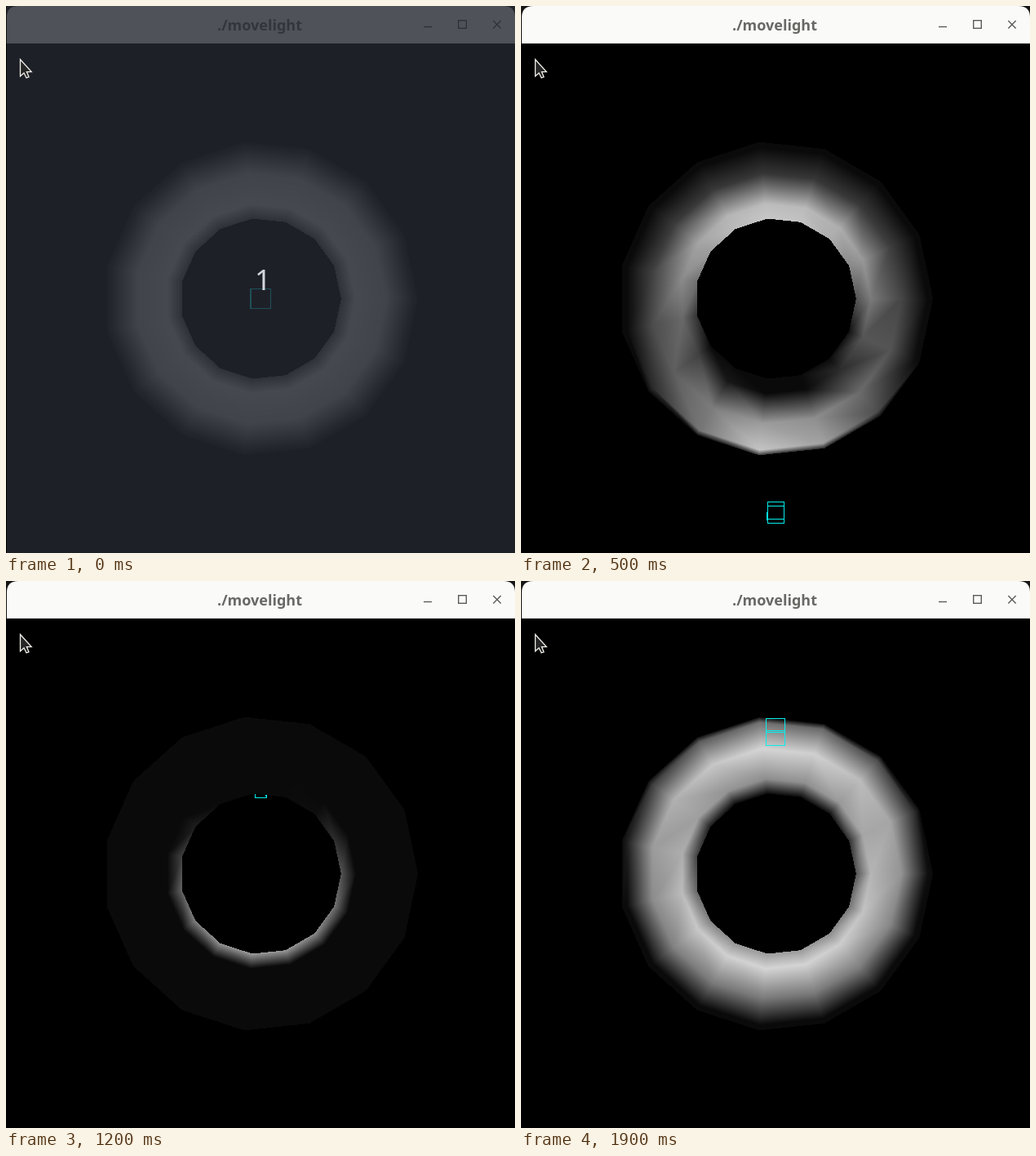
These frames come from a looping animation (624 px wide and 670 px high, 3.1 s). An HTML page with a canvas:

```html
<!DOCTYPE html>
<html lang="en">
<head>
<meta charset="utf-8">
<title>./movelight</title>
<style>
html, body { margin: 0; width: 100%; height: 100%; overflow: hidden; background: #000; }
canvas, svg { position: absolute; left: 0; top: 0; width: 624px; height: 670px; display: block; }
text { font-family: "Noto Sans", "Open Sans", sans-serif; text-anchor: middle; }
</style>
</head>
<body>
<canvas id="view" width="624" height="670"></canvas>
<svg viewBox="0 0 624 670">
  <rect width="624" height="46" fill="#151515"/>
  <path d="M1 46V14Q1 0 15 0H610Q624 0 624 14V46Z" fill="#fafaf8"/>
  <rect x="1" y="45" width="623" height="1" fill="#dededb"/>
  <text x="311" y="30" font-size="18" font-weight="700" fill="#686865">./movelight</text>
  <g fill="none" stroke="#5c5c5a" stroke-width="1.4">
    <path d="M512 25.5H522"/>
    <rect x="554.7" y="17.7" width="9.6" height="9.6"/>
    <path d="M597.3 18L606.7 27.4M606.7 18L597.3 27.4"/>
  </g>
  <g id="veil">
    <rect x="1" width="623" height="670" fill="rgb(38,41,50)" fill-opacity=".8"/>
    <text x="315" y="348" font-size="35" fill="#d3d6dc">1</text>
  </g>
  <path d="M17.5 65.5V86L22 82L25 88L28 86.8L25.4 80.6H31.2Z" fill="#262626" stroke="#f2f0ea" stroke-width="1.3"/>
</svg>
<script>
const W = 624, H = 670, LOOP = 3100;
const CX = 312.2, CY = 358.5, EYE = 5;
const FOCAL = 312 / Math.tan(Math.PI / 9);
const RINGS = 15, SIDES = 8, TUBE = 0.275, RADIUS = 0.85;
const CLICKS = [300, 500, 600, 700, 1000, 1100, 1200, 1400, 1600, 1700, 1900];

const ctx = document.getElementById("view").getContext("2d");
const veil = document.getElementById("veil");
const image = ctx.createImageData(W, H);
const pixels = new Uint32Array(image.data.buffer);
const BLACK = 0xff000000, CYAN = 0xffeeee06;

function project([x, y, z]) {
  const q = 1 / (EYE - z);
  return { x: CX + FOCAL * x * q, y: CY - FOCAL * y * q, q };
}

function rotateX([x, y, z], a) {
  const c = Math.cos(a), s = Math.sin(a);
  return [x, y * c - z * s, y * s + z * c];
}

// Torus vertex with ambient and diffuse light
function vertex(ring, side, light) {
  const psi = 2 * Math.PI * ring / RINGS, phi = 2 * Math.PI * side / SIDES;
  const ring3 = (r, z) => [r * Math.cos(psi), r * Math.sin(psi), z];
  const p = ring3(RADIUS + TUBE * Math.cos(phi), TUBE * Math.sin(phi));
  const n = ring3(Math.cos(phi), Math.sin(phi));
  const l = light.map((v, i) => v - p[i]);
  const dot = l.reduce((sum, v, i) => sum + v * n[i], 0) / Math.hypot(...l);
  return { ...project(p), shade: 255 * (0.04 + 0.8 * Math.max(0, dot)) };
}

function triangle(a, b, c) {
  const edge = (p, q, x, y) => (q.x - p.x) * (y - p.y) - (q.y - p.y) * (x - p.x);
  const area = edge(a, b, c.x, c.y);
  const xs = [a.x, b.x, c.x], ys = [a.y, b.y, c.y];
  const x1 = Math.ceil(Math.max(...xs)), y1 = Math.ceil(Math.max(...ys));
  for (let y = Math.floor(Math.min(...ys)); y < y1; y++) {
    for (let x = Math.floor(Math.min(...xs)); x < x1; x++) {
      const u = edge(b, c, x + 0.5, y + 0.5) / area;
      const v = edge(c, a, x + 0.5, y + 0.5) / area;
      const w = 1 - u - v;
      if (u < -1e-9 || v < -1e-9 || w < -1e-9) continue;
      const ua = u * a.q, vb = v * b.q, wc = w * c.q;
      const g = Math.round((ua * a.shade + vb * b.shade + wc * c.shade) / (ua + vb + wc));
      pixels[y * W + x] = BLACK | g * 0x10101;
    }
  }
}

function drawTorus(light) {
  for (let side = 0; side < SIDES / 2; side++) {
    for (let ring = 0; ring < RINGS; ring++) {
      const a = vertex(ring, side, light), b = vertex(ring + 1, side, light);
      const c = vertex(ring, side + 1, light), d = vertex(ring + 1, side + 1, light);
      triangle(a, b, c);
      triangle(b, c, d);
    }
  }
}

function line(a, b) {
  const n = Math.max(1, Math.ceil(Math.max(Math.abs(b.x - a.x), Math.abs(b.y - a.y))));
  for (let i = 0; i <= n; i++) {
    const x = Math.floor(a.x + (b.x - a.x) * i / n);
    const y = Math.floor(a.y + (b.y - a.y) * i / n);
    pixels[y * W + x] = CYAN;
  }
}

function drawCube(spin) {
  const corner = k => project(rotateX(
    [k & 1 ? 0.05 : -0.05, k & 2 ? 0.05 : -0.05, k & 4 ? 1.55 : 1.45], spin));
  for (let k = 0; k < 8; k++)
    for (const bit of [1, 2, 4])
      if (!(k & bit)) line(corner(k), corner(k | bit));
}

function drawScene(step) {
  const spin = step * Math.PI / 6;
  const light = rotateX([0, 0, 1.5], spin);
  const front = light[2] > 0.3;
  pixels.fill(BLACK);
  if (!front) drawCube(spin);
  drawTorus(light);
  if (front) drawCube(spin);
  ctx.putImageData(image, 0, 0);
}

let shown = -1;
function render(t) {
  const step = CLICKS.filter(c => t >= c).length;
  if (step !== shown) drawScene(shown = step);
  veil.style.display = t < 100 ? "" : "none";
}

let start;
function tick(now) {
  start ??= now;
  render((now - start) % LOOP);
  requestAnimationFrame(tick);
}
render(0);
requestAnimationFrame(tick);
</script>
</body>
</html>
```
